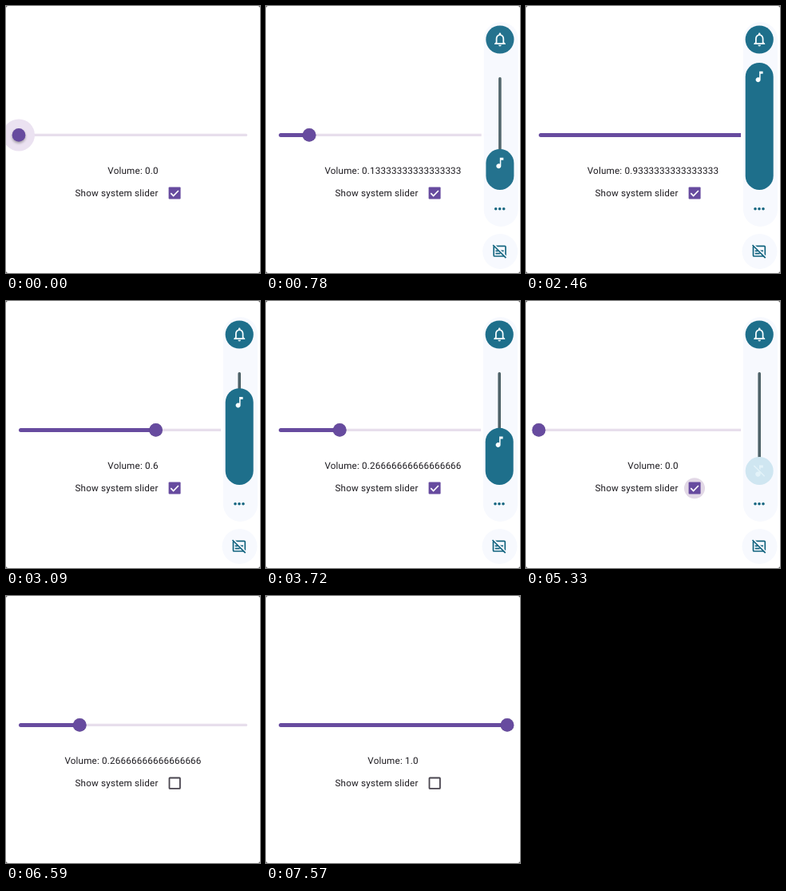
An HTML page for the animation above (8000 ms loop, 318x334 px).

```html
<!DOCTYPE html>
<html lang="en">
<head>
<meta charset="utf-8">
<title>Volume slider</title>
<style>
  html, body { margin: 0; width: 100%; height: 100%; overflow: hidden; background: #555; }
  svg { display: block; width: 318px; height: 334px; background: #fff; border-radius: 3px; }
  text { font: 11.7px Roboto, sans-serif; letter-spacing: .17px; fill: #1d1b20; text-rendering: geometricPrecision; }
</style>
</head>
<body>
<svg viewBox="0 0 318 334">
  <g transform="translate(0 161.4)">
    <path d="M17.5 0H300.5" stroke="#e7deec" stroke-width="3.4" stroke-linecap="round"/>
    <path id="active" stroke="#674b9f" stroke-width="5" stroke-linecap="round"/>
    <g id="thumb">
      <circle id="halo" r="20" fill="#ebe2f1"/>
      <circle id="knob" r="8.4" fill="#674b9f"/>
    </g>
  </g>

  <text id="volume" x="159" y="210" text-anchor="middle"></text>
  <text x="86.5" y="238.2">Show system slider</text>
  <circle id="press" cx="211" cy="234.2" r="13" fill="#e2d8e6"/>
  <g id="checked">
    <rect x="203.6" y="226.6" width="15" height="15" rx="1" fill="#674b9f"/>
    <path d="M206.3 234.2l3.3 3.3 6.3-6.5" fill="none" stroke="#fff" stroke-width="1.7"/>
  </g>
  <rect id="unchecked" x="204.5" y="227.5" width="13.4" height="13.4" rx=".6" fill="none" stroke="#49454f" stroke-width="1.8"/>

  <g id="panel">
    <path d="M269 20h49v309h-49z" fill="#fff"/>
    <rect x="272" y="20" width="43" height="256" rx="21.5" fill="#f7f9fe"/>
    <circle cx="292.5" cy="307" r="22" fill="#f7f9fe"/>
    <circle cx="292.2" cy="42" r="17.6" fill="#1e6f8b"/>
    <path transform="translate(281.8 31.4) scale(.87)" fill="#f8feff" d="M12 22c1.1 0 2-.9 2-2h-4c0 1.1.9 2 2 2zm6-6v-5c0-3.07-1.63-5.64-4.5-6.32V4c0-.83-.67-1.5-1.5-1.5s-1.5.67-1.5 1.5v.68C7.64 5.36 6 7.92 6 11v5l-2 2v1h16v-1l-2-2zm-2 1H8v-6c0-2.48 1.51-4.5 4-4.5s4 2.02 4 4.5v6z"/>
    <path d="M292.2 90.8V210" stroke="#4f6369" stroke-width="3.6" stroke-linecap="round"/>
    <rect id="fill" x="274.7" width="35" rx="17.5"/>
    <path id="note" fill="#f8feff" d="M12 3v10.55c-.59-.34-1.27-.55-2-.55-2.21 0-4 1.79-4 4s1.79 4 4 4 4-1.79 4-4V7h4V3h-6z"/>
    <path id="mute" transform="translate(282.4 203) scale(.8)" fill="#f2fcff" d="M4.27 3L3 4.27l9 9v.28c-.59-.34-1.27-.55-2-.55-2.21 0-4 1.79-4 4s1.79 4 4 4 4-1.79 4-4v-1.73L19.73 21 21 19.73 4.27 3zM14 7h4V3h-6v5.18l2 2z"/>
    <path d="M287 253.7h.01M292 253.7h.01M297 253.7h.01" stroke="#12647f" stroke-width="3.6" stroke-linecap="round"/>
    <g transform="translate(-.3 -.4)" fill="none" stroke="#12647f" stroke-width="1.7">
      <rect x="284.8" y="300.8" width="14.8" height="12.6" rx="1"/>
      <path d="M287 306.8h3.4M292.5 306.8h4.8M287 310h6M295 310h2.3"/>
      <path d="M285.4 299.2l15 15" stroke="#f7f9fe" stroke-width="2"/>
      <path d="M283.8 299.4l16.2 16.2"/>
    </g>
  </g>
</svg>
<script>
const LOOP = 8000, FIRST = 500, STEP = 70;   // the picture advances every STEP ms after FIRST
const MUTE = 54, UNCHECK = 69;
const $ = id => document.getElementById(id);
const show = (id, on) => $(id).style.display = on ? '' : 'none';
const ramp = (k, from, to) => Math.min(1, Math.max(0, (k - from) / (to - from)));

function drawSlider(k) {
  // Two key taps, hold up, hold down, a last tap to zero, then a drag to the end.
  const level = 2 * ramp(k, -1, 1) + 13 * ramp(k, 7.2, 19.3) - 14 * ramp(k, 27, 51)
    - (k >= MUTE) + 15 * ramp(k, 82.5, 100.5);
  const value = Math.round(level) / 15, x = 16 + 286 * value;
  $('thumb').setAttribute('transform', `translate(${x} 0)`);
  $('active').setAttribute('d', value ? `M18.5 0H${x - 2.5}` : '');
  $('volume').textContent = 'Volume: ' + (Number.isInteger(value) ? value + '.0' : value);

  const glow = 1 - ramp(k, -1, 1) + ramp(k, 79, 81) - ramp(k, 83, 85);
  $('halo').style.opacity = glow;
  $('knob').style.filter = `drop-shadow(0 ${.5 + 1.7 * glow}px ${.5 + glow}px rgba(0,0,0,.3))`;
}

function drawCheckbox(k) {
  $('press').style.opacity = k < UNCHECK ? 0 : 1 - ramp(k, UNCHECK, UNCHECK + 3);
  show('checked', k <= UNCHECK);
  show('unchecked', k > UNCHECK);
}

function drawPanel(k) {
  const shown = 1 - (1 - ramp(k, -1, 5)) ** 2 - ramp(k, UNCHECK, UNCHECK + 3);
  $('panel').style.opacity = shown;
  $('panel').setAttribute('transform', `translate(${25 * (1 - shown)} 0)`);

  const top = 195 - 16 * ramp(k, -1, 4) - 108 * ramp(k, 7, 19) ** 2 + 124 * ramp(k, 28, 52) ** 1.2;
  $('fill').setAttribute('y', top);
  $('fill').setAttribute('height', 230 - top);
  $('fill').setAttribute('fill', k < UNCHECK ? '#1e6f8b' : '#cfe6f1');
  $('note').setAttribute('transform', `translate(283.1 ${top + 8.5}) scale(.75)`);
  show('note', k < MUTE);
  show('mute', k >= MUTE);
  $('mute').style.opacity = k < UNCHECK ? 1 : .6;
}

const start = performance.now();
function tick() {
  const t = (performance.now() - start) % LOOP;
  const k = Math.max(-1, Math.floor((t - FIRST) / STEP));
  drawSlider(k);
  drawCheckbox(k);
  drawPanel(k);
  requestAnimationFrame(tick);
}
tick();
</script>
</body>
</html>
```
